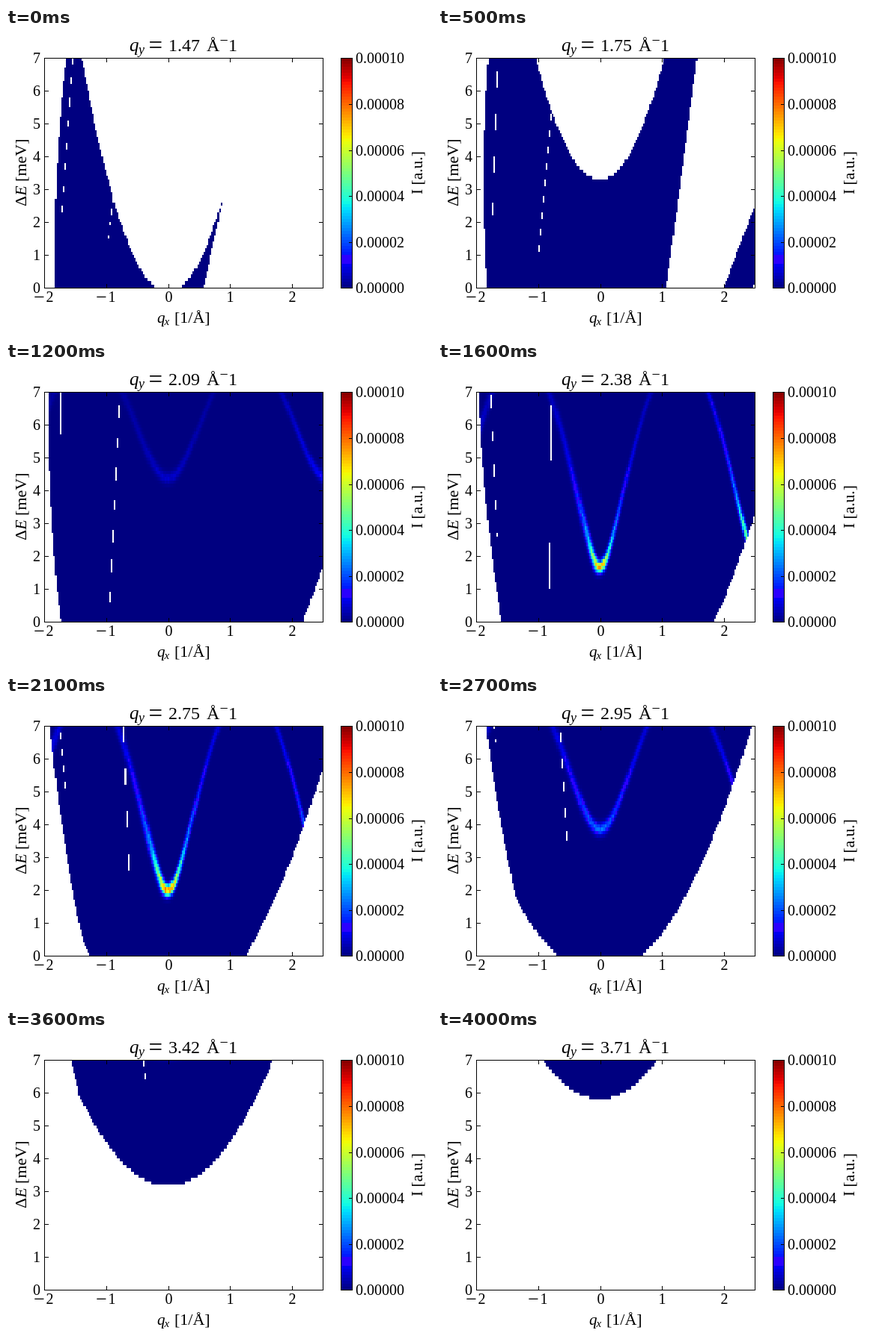
Animation, 569 px wide and 410 px high, one loop 4.1 s. Source, as an HTML page with a canvas:

```html
<!DOCTYPE html>
<html lang="en">
<head>
<meta charset="utf-8">
<title>Intensity slices</title>
<style>
html, body { margin: 0; width: 100%; height: 100%; overflow: hidden; background: #fff; }
canvas { position: absolute; left: 51px; top: 40px; width: 372px; height: 308px; image-rendering: pixelated; }
svg { position: absolute; left: 0; top: 0; font-family: "Liberation Serif", "Times New Roman", serif; }
.i { font-style: italic; }
</style>
</head>
<body>
<canvas id="map" width="180" height="70"></canvas>
<svg id="plot" width="569" height="410" viewBox="0 0 569 410"></svg>
<script>
const COLS = 180, ROWS = 70, CELL = 0.025, STEP = 100, FRAMES = 41;
const svg = document.getElementById('plot');
const ctx = document.getElementById('map').getContext('2d');
const image = ctx.createImageData(COLS, ROWS);

// ---- helpers
const clamp = v => Math.max(0, Math.min(1, v));
const sq = v => v * v;
const noise = (a, b, c) => {
  const n = Math.sin(a * 12.99 + b * 78.23 + c * 37.7) * 43758.5453;
  return n - Math.floor(n);
};

function add(tag, attrs, text = '') {
  const el = document.createElementNS('http://www.w3.org/2000/svg', tag);
  for (const k in attrs) el.setAttribute(k, attrs[k]);
  el.textContent = text;
  svg.appendChild(el);
  return el;
}
const label = (text, x, y, size = 20, more = {}) =>
  add('text', { x, y, 'font-size': size, ...more }, text);
const line = d => add('path', { d, fill: 'none', stroke: '#000', 'shape-rendering': 'crispEdges' });

// Jet colours, with the violet band the scale shows near its lower end.
function jet(v) {
  if (v > 0.107 && v < 0.147) return [42, 0, 255];
  const r = v < 0.89 ? (v - 0.35) / 0.31 : 1 - (v - 0.89) / 0.22;
  const g = v < 0.5 ? (v - 0.125) / 0.25 : 1 - (v - 0.64) / 0.27;
  const b = v < 0.2 ? 0.5 + v / 0.22 : 1 - (v - 0.34) / 0.31;
  return [r, g, b].map(c => Math.round(255 * clamp(c)));
}

// ---- slice position: straight runs between a few steps
const KEYS = [[0, 1.47], [5, 1.75], [12, 2.09], [21, 2.75], [27, 2.95], [30, 3.11], [33, 3.21], [40, 3.71]];

function sliceAt(step) {
  const i = Math.max(1, KEYS.findIndex(([s]) => s >= step));
  const [s0, q0] = KEYS[i - 1], [s1, q1] = KEYS[i];
  return q0 + (q1 - q0) * (step - s0) / (s1 - s0);
}

// ---- measured region in the (x, e) plane
const leftEdge = (e, q) => -1.83 - 0.018 * e + 0.37 * sq(q - 1.58 - 0.115 * e);
const floorAt = (x, q) =>
  -1.9 + 6.25 * (q - 2.75) + 1.85 * sq(q - 2.75) + (1.1 + 0.18 * (q - 2.09)) * x * x;
const roofAt = (x, dq) => -0.15 + 12.3 * dq + (3.68 - 0.93 * dq) * x * x;
const gapStart = (e, dq) => 0.577 + 1.76 * dq + (0.115 - 0.155 * dq) * e;
const gapEnd = (e, q) => 2 - 4.8 * (q - 1.75) + 0.2 * e;

// A slanted seam drops the cells whose column centre it passes, which leaves dashes.
function inSeam(col, offset, width) {
  const p = (offset + 2) / CELL - col;
  return p >= 0 && p < width;
}

function covered(col, x, e, q) {
  const dq = q - 1.47;
  if (x < leftEdge(e, q) || e < floorAt(x, q) || e > roofAt(x, dq)) return false;
  if (x > gapStart(e, dq) && x < gapEnd(e, q)) return false;
  if (e > 0.6 + 2.8 * sq(q - 2) &&
      inSeam(col, -1.08 + 0.3 * dq * dq + (0.07 - 0.07 * dq) * e, 0.4)) return false;
  return !(e > 1.5 + 4.5 * sq(q - 1.9) &&
      inSeam(col, -1.81 + 0.24 * dq * dq + (0.038 - 0.068 * dq) * e, 0.35));
}

// Dispersion of the excitation, periodic in both directions.
const K = Math.PI / 2.57;
const energy = (x, q) =>
  8.2 * Math.sqrt(Math.max(0, 1 - sq(Math.cos(K * x) * Math.cos(K * (q - 2.55)))));

function drawMap(q) {
  const weight = clamp(0.35 + (q - 2.09) * 0.985);
  for (let col = 0; col < COLS; col++) {
    const x = -2 + (col + 0.5) * CELL;
    const mid = energy(x, q);
    const slope = (energy(x + 0.02, q) - energy(x - 0.02, q)) / 0.04;
    const sigma = Math.hypot(0.12, slope * (x < 0 ? 0.028 : 0.016));
    const side = x > 1.3 && q < 2.5 ? 1.8 : 1;
    const peak = side * weight * 2.8 / Math.pow(Math.max(mid, 0.4), 1.85);
    for (let row = 0; row < ROWS; row++) {
      const e = 7 - (row + 0.5) * 0.1;
      const v = peak * Math.exp(-sq((e - mid) / sigma) / 2) * (0.85 + 0.3 * noise(col, row, q));
      const rgb = covered(col, x, e, q) ? jet(clamp(v)) : [255, 255, 255];
      image.data.set([...rgb, 255], (row * COLS + col) * 4);
    }
  }
  ctx.putImageData(image, 0, 0);
}

// ---- colour bar, axes and labels
for (let y = 40; y < 348; y += 4) {
  add('rect', { x: 447, y, width: 15, height: 4, fill: `rgb(${jet((346 - y) / 308)})` });
}
line('M51.5 40.5H423.5V348.5H51.5Z');
line('M447.5 40.5H462.5V348.5H447.5Z');

const middle = { 'text-anchor': 'middle' };
for (let n = -2; n <= 2; n++) {
  const x = Math.round(51.3 + (n + 2) * 82.67) + 0.5;
  line(`M${x} 348v-5M${x} 41v5`);
  label(Math.abs(n), n < 0 ? x + 7 : x, 367, 20, middle);
  if (n < 0) label('−', x - 7, 369, 26, middle);
}
for (let n = 0; n <= 7; n++) {
  const y = 348.5 - n * 44;
  line(`M52 ${y}h5M423 ${y}h-5`);
  label(n, 46, y + 6.5, 20, { 'text-anchor': 'end' });
}
for (let n = 0; n <= 10; n += 2) {
  const y = Math.round(348.4 - n * 30.8) + 0.5;
  line(`M462 ${y}h-4`);
  label((n / 1e5).toFixed(5), 467, y + 6.5);
}

const italic = { class: 'i' };
label('q', 202, 395, 21, italic);
label('x', 211.5, 398, 15, italic);
label('[1/Å]', 225, 395, 22);
const rise = label('', 0, 0, 22, { transform: 'translate(27 239) rotate(-90)' });
rise.innerHTML = 'Δ<tspan class="i">E</tspan> [meV]';
label('I [a.u.]', 0, 0, 21.5, { transform: 'translate(556 223) rotate(-90)' });

label('q', 165, 31, 25, italic);
label('y', 177, 35, 18, italic);
label('=', 190.5, 34, 33);
const value = label('', 217, 31, 24);
label('Å', 268, 31, 24);
label('−', 285.5, 23, 20);
label('1', 297, 31, 24);

// ---- playback
const start = performance.now();
let shown = -1;
function tick() {
  const step = Math.floor((performance.now() - start) / STEP) % FRAMES;
  if (step !== shown) {
    shown = step;
    const q = sliceAt(step);
    value.textContent = q.toFixed(2);
    drawMap(q);
  }
  requestAnimationFrame(tick);
}
tick();
</script>
</body>
</html>
```
